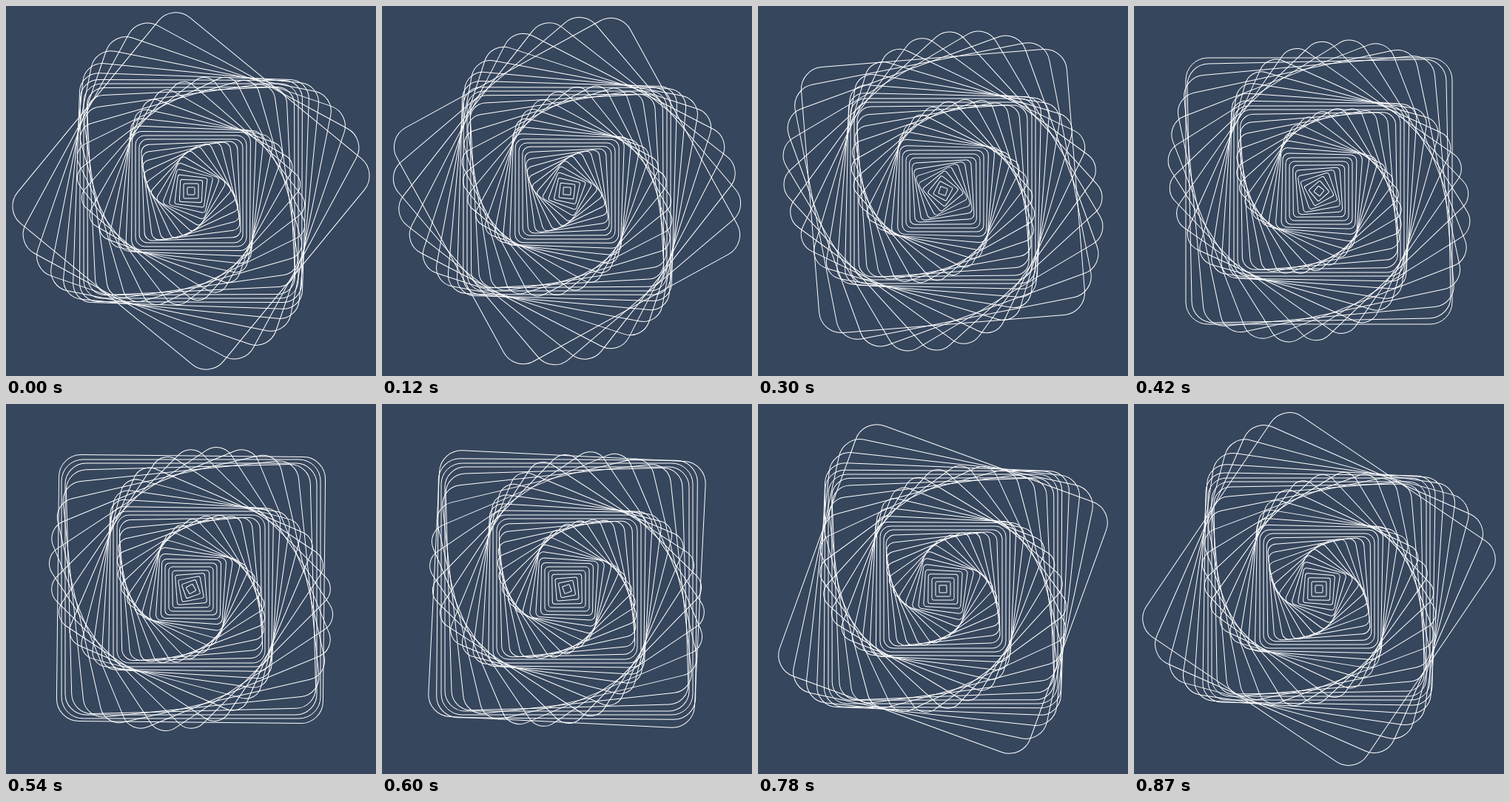
These frames come from a looping animation (500 by 500 pixels, 0.9 s). An HTML page with a canvas:

```html
<!DOCTYPE html>
<html>
<head>
<meta charset="utf-8">
<style>
  html, body { margin: 0; height: 100%; overflow: hidden; background: #36465d; }
  canvas { display: block; }
</style>
</head>
<body>
<canvas id="stage" width="500" height="500"></canvas>
<script>
const ctx = document.getElementById('stage').getContext('2d');
const LOOP = 900, STEP = 30, RINGS = 36;
const RINGS_PER_TURN = 14.13, START_RING = 29.52;
const MOVE = 0.92; // share of each cycle spent turning; the rest is a pause

// Cubic Bezier easing with flat ends: control points (0.455, 0) and (0.64, 1).
function ease(x) {
  let low = 0, high = 1;
  for (let n = 0; n < 20; n++) {
    const s = (low + high) / 2, r = 1 - s;
    if (3 * r * r * s * 0.455 + 3 * r * s * s * 0.64 + s ** 3 < x) low = s;
    else high = s;
  }
  return low * low * (3 - 2 * low);
}

// Each cycle is one quarter turn.
function angle(phase) {
  const part = phase - Math.floor(phase);
  return ease(Math.min(part / MOVE, 1)) * Math.PI / 2;
}

function drawSquare(size, rotation) {
  ctx.save();
  ctx.translate(250, 250);
  ctx.rotate(rotation);
  ctx.beginPath();
  ctx.roundRect(-size / 2, -size / 2, size, size, size / 12);
  ctx.stroke();
  ctx.restore();
}

function draw(ms) {
  const time = Math.floor((ms % LOOP) / STEP) * STEP / LOOP;
  ctx.fillStyle = '#36465d';
  ctx.fillRect(0, 0, 500, 500);
  ctx.strokeStyle = '#fff';
  ctx.lineWidth = 1;
  for (let i = 1; i <= RINGS; i++) {
    drawSquare(i * 10, angle(time + (i - START_RING) / RINGS_PER_TURN));
  }
}

let start;
function tick(now) {
  start ??= now;
  draw(now - start);
  requestAnimationFrame(tick);
}
draw(0);
requestAnimationFrame(tick);
</script>
</body>
</html>
```
